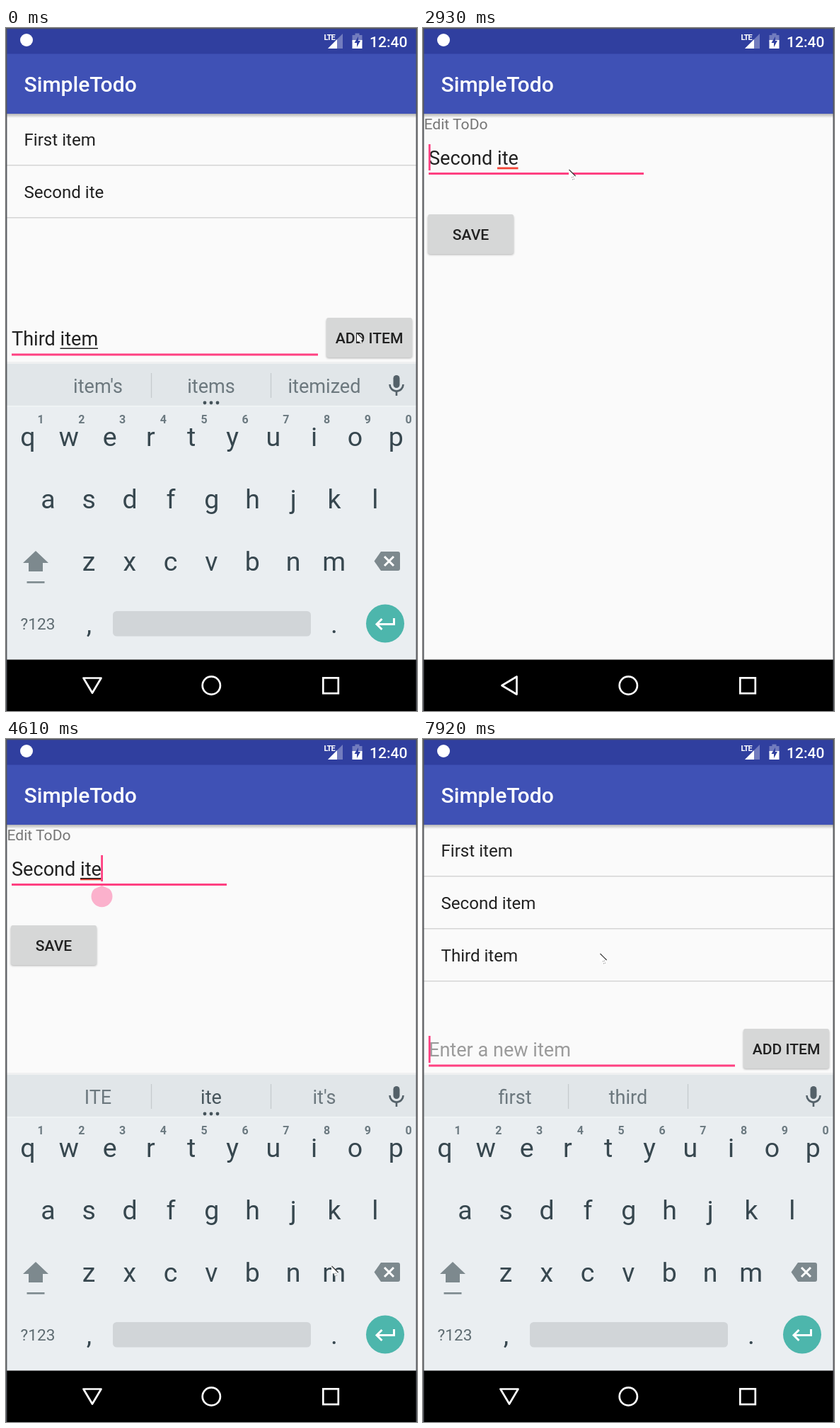
An HTML page that plays this animation: 581x964 px, repeating every 8000 ms.

```html
<!DOCTYPE html>
<html lang="en">
<head>
<meta charset="utf-8">
<title>Todo demo</title>
<style>
html, body { margin: 0; width: 100%; height: 100%; overflow: hidden; background: #fafafa; }
svg { display: block; width: 100vw; height: 100vh; }
text { font-family: Roboto, "Noto Sans", sans-serif; white-space: pre; }
</style>
</head>
<body>
<svg id="stage" viewBox="0 0 581 964" preserveAspectRatio="none">
  <defs>
    <linearGradient id="fade" x2="0" y2="1">
      <stop stop-color="#000" stop-opacity=".28"/><stop offset="1" stop-color="#000" stop-opacity="0"/>
    </linearGradient>
    <filter id="soft" x="-20%" y="-20%" width="140%" height="140%"><feGaussianBlur stdDeviation="1.6"/></filter>
  </defs>
  <rect width="581" height="964" fill="#fafafa"/>
  <g id="main"></g>
  <g id="edit"></g>
  <g id="bar"></g>
  <g id="keys"></g>
  <g id="menu"></g>
  <g id="nav"></g>
  <g id="mouse">
    <path d="M0 0V12L3 9.8L5 14.5L7.4 13.4L5.4 9H9.6Z" fill="#fff"/>
    <path d="M.5 0L9.6 9" stroke="#333" stroke-width="1.1"/>
    <path d="M4 11l3-1M5 14l3-1" stroke="#777" stroke-dasharray="1.2 1"/>
  </g>
  <path d="M.7 964V.5H580.3V964" fill="none" stroke="#55575c" stroke-width="1.4"/>
</svg>
<script>
const LOOP = 8000, PINK = '#ff4081', INK = '#212121', KEY = '#37474f';
const $ = id => document.getElementById(id);
const within = (t, a, b) => t >= a && t < b;

function add(parent, tag, attrs, content) {
  const el = document.createElementNS('http://www.w3.org/2000/svg', tag);
  for (const k in attrs) el.setAttribute(k, attrs[k]);
  if (content !== undefined) el.textContent = content;
  return parent.appendChild(el);
}
const rect = (p, x, y, width, height, fill, rx = 0) => add(p, 'rect', { x, y, width, height, fill, rx });
const path = (p, d, fill, more) => add(p, 'path', { d, fill, ...more });
const text = (p, x, y, size, fill, str, more) =>
  add(p, 'text', { x, y, 'font-size': size, fill, ...more }, str);
const MID = { 'text-anchor': 'middle' };
const MEDIUM = { 'font-weight': 500 };
const show = (el, on) => el.setAttribute('visibility', on ? 'inherit' : 'hidden');

function button(p, x, y, label) {
  const shade = rect(p, x, y + 2, 121, 55, '#000', 3);
  shade.setAttribute('filter', 'url(#soft)');
  const face = rect(p, x, y, 121, 56, '#d6d7d7', 3);
  text(p, x + 60.5, y + 35.5, 21.1, INK, label, { ...MID, ...MEDIUM });
  return down => {
    shade.setAttribute('opacity', down ? .5 : .3);
    shade.setAttribute('height', down ? 58 : 55);
    face.setAttribute('fill', down ? '#cbcccc' : '#d6d7d7');
  };
}

// list screen
const main = $('main');
const rowGlow = rect(main, 1, 194, 579, 73, '#dcdcdc');
const rows = ['First item', 'Second ite', 'Third item'].map((s, i) => {
  const g = add(main, 'g', {});
  const label = text(g, 25.5, 165.5 + 74 * i, 24.1, INK, s);
  rect(g, 1, 193 + 74 * i, 579, 1.4, '#d3d3d3');
  return { g, label };
});
rect(main, 8, 459.5, 433, 3, PINK);
const draft = add(main, 'g', {});
text(draft, 8, 448, 27.1, INK, 'Third item');
rect(draft, 76.5, 451.5, 53.5, 1.5, INK);
const hint = text(main, 8, 448, 27.1, '#9b9b9b', 'Enter a new item');
const pressAdd = button(main, 453, 409, 'ADD ITEM');

// edit screen
const edit = $('edit');
rect(edit, 0, 121, 581, 771, '#fafafa');
text(edit, 1.5, 143, 21.1, '#757575', 'Edit ToDo');
const mark = rect(edit, 105, 164, 29.5, 38, '#f9a8ab');
const field = text(edit, 8, 193, 27.1, INK, '');
const typo = rect(edit, 105, 196.5, 29.5, 2.8, '#f44336');
const under = rect(edit, 105, 196, 29.5, 1.6, INK);
const grip = path(edit, 'M135.5 207L146 211.5A15 15 0 1 1 125 211.5Z', '#fbb1cc');
rect(edit, 8, 204, 304, 3, PINK);
const pressSave = button(edit, 7, 263, 'SAVE');
const carets = { main: rect(main, 0, 419, 2.8, 38, PINK), edit: rect(edit, 0, 164, 2.8, 37, PINK) };

// status bar and toolbar
const bar = $('bar');
rect(bar, 0, 121, 581, 6, 'url(#fade)');
rect(bar, 0, 0, 581, 37, '#303f9f');
rect(bar, 0, 36.5, 581, 84.5, '#3f51b5');
add(bar, 'circle', { cx: 29, cy: 17, r: 9, fill: '#fff' });
text(bar, 449.5, 17, 11, '#fff', 'LTE', { 'font-weight': 700, 'letter-spacing': -.8 });
path(bar, 'M455 29L476 8V29Z', '#fff', { opacity: .32 });
path(bar, 'M455 29L468 16V29Z', '#fff');
path(bar, 'M489.500 10H493.500V7.500H499.500V10H503.500V20H489.500Z', '#fff', { opacity: .32 });
rect(bar, 489.5, 17, 14, 12, '#fff');
path(bar, 'M498 12L492.500 21H496V27L501 18H498Z', '#303f9f');
text(bar, 514, 26.5, 21.1, '#fff', '12:40', MEDIUM);
text(bar, 25.5, 90, 30.1, '#fff', 'SimpleTodo', MEDIUM);

// keyboard
const keys = $('keys');
rect(keys, 0, 471, 581, 3, '#eff0f1');
rect(keys, 0, 474, 581, 59, '#e1e6e9');
rect(keys, 0, 533, 581, 359, '#eaeef1');
rect(keys, 0, 533, 581, 1.5, '#f2f5f6');
[205.5, 374.5].forEach(x => rect(keys, x - .6, 487, 1.3, 35, '#c5cbce'));
const words = [130, 290, 450].map(x => text(keys, x, 515, 27.1, '#6c787e', '', MID));
const dots = add(keys, 'g', { fill: '#45535a' });
[281, 290, 299].forEach(cx => add(dots, 'circle', { cx, cy: 529, r: 2.4 }));
rect(keys, 547.5, 490, 9, 18, '#546169', 4.5);
path(keys, 'M542.500 503A9.500 9.500 0 0 0 561.500 503M552 512V519', 'none', { stroke: '#546169', 'stroke-width': 2.6 });
[['qwertyuiop', 31, 590], ['asdfghjkl', 59.5, 678], ['zxcvbnm', 117, 766]].forEach(([row, x, y]) =>
  [...row].forEach((c, i) => text(keys, x + 57.8 * i, y, 37.5, KEY, c, MID)));
[...'1234567890'].forEach((c, i) =>
  text(keys, 49 + 57.8 * i, 558, 16, '#6b7980', c, { ...MID, 'font-weight': 700 }));
path(keys, 'M42 738L60 755H52V767H32V755H24Z', '#7d898e');
rect(keys, 29.5, 781, 25, 2.6, '#7d898e');
path(keys, 'M530 739H554Q557 739 557 742V763Q557 766 554 766H530L520.500 752.500Z', '#7d898e');
path(keys, 'M535 746L548 759M548 746L535 759', 'none', { stroke: '#fff', 'stroke-width': 3 });
text(keys, 45, 849, 22.6, '#5f6c72', '?123', MID);
text(keys, 117.5, 854, 37.5, KEY, ',', MID);
text(keys, 464, 854, 37.5, KEY, '.', MID);
rect(keys, 151, 823, 280, 35.5, '#d1d5d8', 5.5);
add(keys, 'circle', { cx: 536, cy: 840.5, r: 27, fill: '#4db6ac' });
path(keys, 'M548.500 833V841.500H525M531.500 834L524 841.500L531.500 849', 'none', { stroke: '#fff', 'stroke-width': 3 });

// spelling menu
const menu = $('menu');
rect(menu, 13, 211, 255, 434, '#000', 4).setAttribute('filter', 'url(#soft)');
menu.firstChild.setAttribute('opacity', .5);
path(menu, 'M13.500 207.500H267.500V640Q267.500 642.500 265 642.500H16Q13.500 642.500 13.500 640Z', '#fdfdfd');
path(menu, 'M13.500 519H267.500V640Q267.500 642.500 265 642.500H16Q13.500 642.500 13.500 640Z', '#e8e8e8');
['ITE', "it's", 'its', 'items', 'site', 'Add to dictionary', 'Delete'].forEach((s, i) => {
  if (i) rect(menu, 13.5, 205.8 + 62.5 * i, 254, 1.3, '#bdbdbd');
  text(menu, 37.5, 248 + 62.5 * i, 27.1, i < 5 ? '#0f76bb' : '#333', s);
});

// navigation bar
const nav = $('nav');
rect(nav, 0, 891.5, 581, 72.5, '#000');
const line = { stroke: '#fff', 'stroke-width': 2.7, 'stroke-linejoin': 'round' };
const back = path(nav, 'M111.500 928L132.500 915.500V940.500Z', 'none', line);
const hide = path(nav, 'M109.500 917.500H134.500L122 938.500Z', 'none', line);
add(nav, 'circle', { cx: 290.3, cy: 928, r: 12.6, fill: 'none', ...line });
rect(nav, 448.3, 917.3, 21.5, 21.8, 'none').setAttribute('style', 'stroke:#fff;stroke-width:2.7');

// pointer moves: start, end, steps, x, y
const moves = [
  [1083, 1840, 7, 153, 296], [1990, 1990, 1, 152, 291], [2130, 2260, 2, 193, 232],
  [2540, 2930, 4, 206, 200], [3600, 3750, 2, 432, 822], [3896, 3896, 1, 460, 876],
  [4042, 4330, 3, 460, 744], [5890, 6130, 3, 175, 400], [6290, 6560, 3, 88, 296],
  [7520, 7650, 2, 250, 303]
];
function pointer(t) {
  let x = 496, y = 431;
  for (const [a, b, n, tx, ty] of moves) {
    if (t < a) break;
    const step = n > 1 ? Math.min(n, Math.floor((t - a) / (b - a) * (n - 1) + 1e-6) + 1) : 1;
    const u = step / n, e = u * u * (3 - 2 * u);
    x += (tx - x) * e;
    y += (ty - y) * e;
  }
  return [x, y];
}

// caret: from, to, x
const blinks = {
  main: [[120, 830, 129.5], [830, 1335, 7.8], [1840, 1990, 7.8], [2260, 2670, 7.8], [7220, 7520, 7.8], [7920, 8000, 7.8]],
  edit: [[2670, 3340, 7.8], [4610, 5180, 134.2], [5460, 5890, 158], [6430, 6830, 158]]
};
const suggest = [
  [7100, 'first', 'third', ''], [5460, "item's", 'items', 'itemized'], [3000, 'ITE', 'ite', "it's"],
  [830, 'first', 'third', ''], [0, "item's", 'items', 'itemized']
];

function draw(t) {
  show(draft, t < 830);
  show(hint, t >= 830);
  show(rows[2].g, t >= 830);
  rows[1].label.textContent = t < 7100 ? 'Second ite' : 'Second item';
  show(rowGlow, within(t, 2540, 2800));
  pressAdd(within(t, 120, 830));

  show(edit, within(t, 2670, 7220));
  const alpha = t < 2800 ? .55 : t < 2930 ? .92 : t < 7100 ? 1 : .4;
  edit.setAttribute('opacity', alpha);
  edit.setAttribute('transform', `translate(0 ${(1 - alpha) * 60})`);
  const typed = t >= 5460, tapped = t >= 3600;
  field.textContent = typed ? 'Second item' : 'Second ite';
  show(typo, !typed);
  show(under, tapped);
  under.setAttribute('width', typed ? 53.5 : 29.5);
  show(mark, within(t, 3600, 4610));
  show(menu, within(t, 3600, 4610));
  show(grip, within(t, 4610, 5460));
  pressSave(within(t, 6700, 7100));

  for (const k in carets) {
    const b = blinks[k].find(([a, z]) => within(t, a, z));
    show(carets[k], b);
    if (b) carets[k].setAttribute('x', b[2]);
  }

  const open = !within(t, 2670, 3470);
  show(keys, open);
  keys.setAttribute('transform', `translate(0 ${within(t, 3470, 3600) ? 90 : 0})`);
  show(hide, open);
  show(back, !open);
  const set = suggest.find(s => t >= s[0]);
  words.forEach((w, i) => w.textContent = set[i + 1]);
  words[1].setAttribute('fill', set[2] === 'ite' ? '#47555c' : '#6c787e');
  show(dots, set[3]);

  $('mouse').setAttribute('transform', `translate(${pointer(t).join(' ')})`);
}

const begin = performance.now();
function tick() {
  draw((performance.now() - begin) % LOOP);
  requestAnimationFrame(tick);
}
tick();
</script>
</body>
</html>
```
